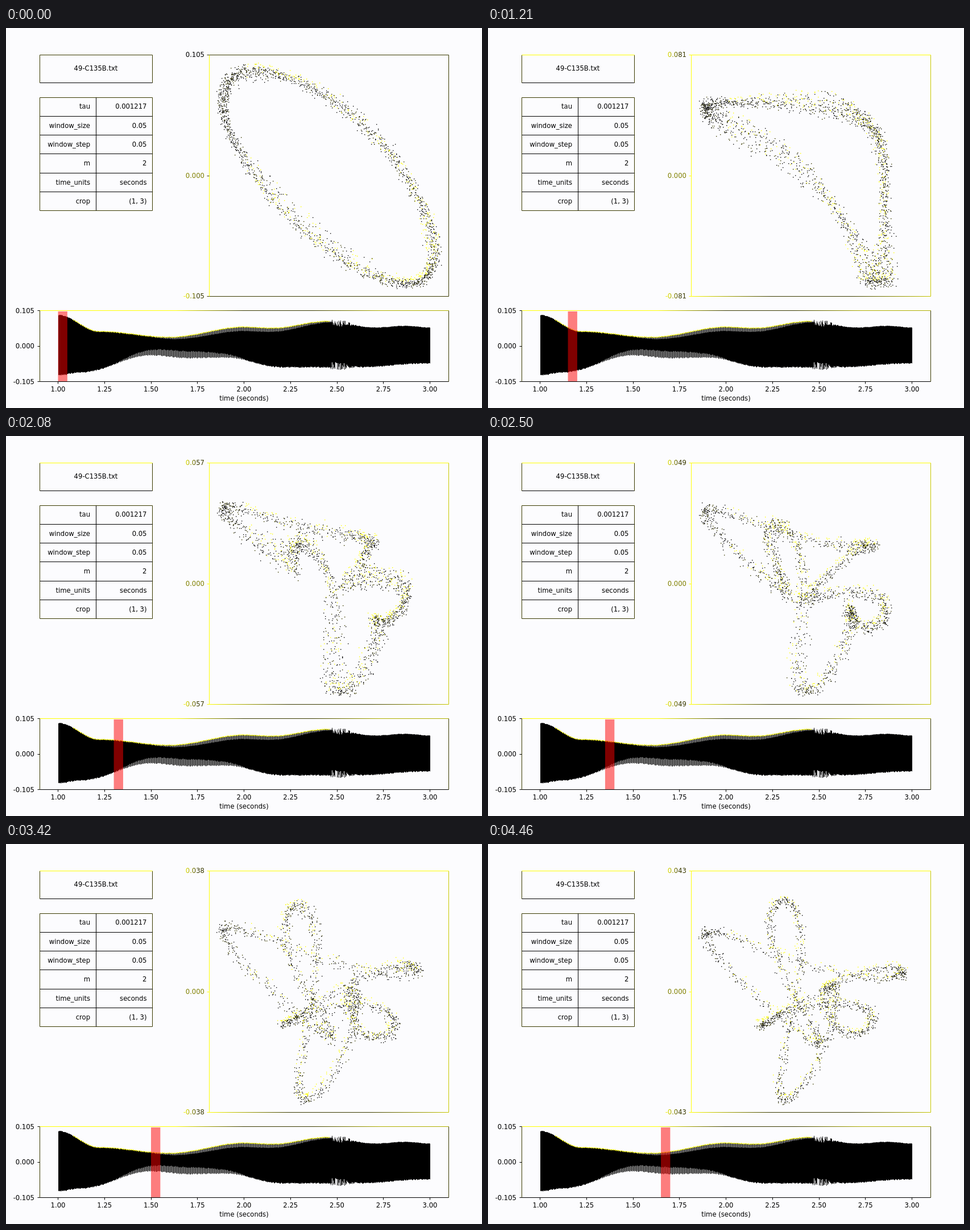
Write an HTML page with a canvas that moves like this. It is 837 px wide and 669 px high and loops after 4.5 s.

```html
<!DOCTYPE html>
<html lang="en">
<head>
<meta charset="utf-8">
<title>Delay embedding</title>
<style>
html, body { margin: 0; width: 100%; height: 100%; overflow: hidden; background: #fcfcfe; }
canvas { display: block; }
</style>
</head>
<body>
<canvas id="stage" width="837" height="669"></canvas>
<script>
const ctx = document.getElementById('stage').getContext('2d');
const INK = '#000', OLIVE = '#3a3a00', YELLOW = '#ff0';
const LOOP = 4500, WINDOWS_PER_SECOND = 3;
const TURN = 2 * Math.PI, DELAY = TURN * 3 / 8;

// Plot limit of each window, in thousandths.
const limits = [105, 97, 89, 81, 73, 66, 57, 49, 44, 40, 38, 37, 40, 43];

// Harmonics of the periodic signal, from the constant term up: [amplitude, phase in degrees].
const overtones = [[.07, 0], [.3, 0], [.3, -5], [.17, -12], [.09, 180]];
const voices = [
  { at: 0, harmonics: [[0, 0], [.9, 130]] },
  { at: 2, harmonics: [[.06, 0], [.76, 149], [.155, 68]] },
  { at: 5, harmonics: [[.08, 0], [.68, 110], [.25, 85], [.07, 18]] },
  { at: 9, harmonics: [[-.03, 0], [.47, 85], ...overtones] },
  { at: 11, harmonics: [[-.03, 0], [.26, 79], ...overtones] }
];

const mix = (a, b, f) => a + (b - a) * f;
const clamp = (v, lo, hi) => Math.min(hi, Math.max(lo, v));

function seeded(seed) {
  return () => {
    seed = seed + 0x6D2B79F5 | 0;
    let h = Math.imul(seed ^ seed >>> 15, seed | 1);
    h ^= h + Math.imul(h ^ h >>> 7, h | 61);
    return ((h ^ h >>> 14) >>> 0) / 4294967296;
  };
}

// Cosine interpolation through [x, y] knots.
function ease(knots, x) {
  const i = Math.max(1, knots.findIndex(k => k[0] >= x));
  const [[x1, y1], [x2, y2]] = [knots[i - 1], knots[i]];
  return mix(y1, y2, .5 - .5 * Math.cos(Math.PI * (x - x1) / (x2 - x1)));
}

// The signal at a (fractional) window, scaled to fill the plot.
function signalAt(position) {
  const p = clamp(position, 0, 11);
  const next = Math.max(1, voices.findIndex(v => v.at >= p));
  const a = voices[next - 1], b = voices[next];
  const f = 1 - (1 - (p - a.at) / (b.at - a.at)) ** 2;
  const wave = (voice, t) => voice.harmonics.reduce(
    (sum, [amp, phase], n) => sum + amp * Math.cos(n * t - phase * TURN / 360), 0);
  const raw = t => mix(wave(a, t), wave(b, t), f);
  let peak = 0;
  for (let t = 0; t < TURN; t += .05) peak = Math.max(peak, Math.abs(raw(t)));
  return t => .89 * raw(t) / peak;
}

function line(x1, y1, x2, y2, color = INK) {
  const [a, b, c, d] = [x1, y1, x2, y2].map(v => Math.floor(v) + .5);
  ctx.strokeStyle = color;
  ctx.beginPath();
  ctx.moveTo(a, b);
  ctx.lineTo(c, d);
  ctx.stroke();
}
function frame(x1, y1, x2, y2, [top, right, bottom, left]) {
  line(x1, y2, x2, y2, bottom);
  line(x2, y1, x2, y2, right);
  line(x1, y1, x1, y2, left);
  line(x1, y1, x2, y1, top);
}
function text(value, x, y, align = 'right', color = INK) {
  ctx.textAlign = align;
  ctx.fillStyle = color;
  ctx.fillText(value, x, y + 4);
}
function fade(x1, x2, ...colors) {
  const g = ctx.createLinearGradient(x1, 0, x2, 0);
  colors.forEach((c, i) => g.addColorStop(i / (colors.length - 1), c));
  return g;
}

function drawTable(k) {
  frame(59, 47, 257, 96.5, [k ? YELLOW : OLIVE, OLIVE, INK, OLIVE]);
  text('49-C135B.txt', 158, 71, 'center');
  frame(59, 122, 257, 321.7, [OLIVE, OLIVE, OLIVE, OLIVE]);
  line(158, 122, 158, 321.7);
  const rows = [['tau', '0.001217'], ['window_size', '0.05'], ['window_step', '0.05'],
    ['m', '2'], ['time_units', 'seconds'], ['crop', '(1, 3)']];
  rows.forEach(([name, value], i) => {
    const y = 122 + i * 33.3;
    if (i) line(59, y, 257, y);
    text(name, 148, y + 16.3);
    text(value, 247.5, y + 16.3);
  });
}

function drawOrbit(k) {
  const random = seeded(k + 11), cycles = 15, samples = 143, spread = 12;
  const jitter = () => random() + random() - 1;
  for (let c = 0; c < cycles; c++) {
    const signal = signalAt(k + c / cycles - .5);
    for (let i = 0; i < samples; i++) {
      const t = TURN * (i + random()) / samples;
      const jx = jitter(), jy = jitter();
      const x = 568 + 211 * signal(t) + jx * spread;
      const y = 260 - 212 * signal(t + DELAY) + jy * spread;
      const lit = jx * .5 + jy < -.35 && x > 420;
      ctx.fillStyle = lit ? YELLOW : random() < .3 ? OLIVE : '#111';
      ctx.fillRect(Math.round(x), Math.round(y), 1.4, 1.4);
    }
  }

  const limit = (limits[k] / 1000).toFixed(3);
  const tint = fade(312, 349, YELLOW, '#a0a000', OLIVE, OLIVE);
  const base = fade(357, 778, YELLOW, OLIVE, OLIVE, '#c8c800');
  frame(357, 47, 778, 472, [k ? YELLOW : OLIVE, k ? '#c8c800' : OLIVE, k ? base : OLIVE, YELLOW]);
  [[limit, 47, k ? tint : INK], ['0.000', 260, '#808000'], ['-' + limit, 472, tint]].forEach(([label, y, color]) => {
    line(353, y, 357, y, k ? YELLOW : OLIVE);
    text(label, 349, y, 'right', color);
  });
}

function drawWave(k) {
  const top = [[1, 505], [1.22, 534], [1.6, 544], [2, 526], [2.15, 528], [2.45, 516], [2.7, 527], [2.87, 524], [3, 527]];
  const bottom = [[1, 612], [1.12, 607], [1.5, 577], [1.7, 582], [1.9, 581], [2.2, 598], [2.6, 598], [3, 591]];
  const bump = (t, from, to) => Math.sin(Math.PI * clamp((t - from) / (to - from), 0, 1));
  const random = seeded(5);
  for (let x = 92; x < 746; x++) {
    const t = Math.min(3, 1 + (x - 91.5) / 327);
    const burst = t > 2.465 ? Math.exp(-(((t - 2.5) / .07) ** 2)) : 0;
    const high = ease(top, t) + burst * (14 * random() - 7) + random();
    const low = ease(bottom, t) + burst * (16 * random() - 10) - 2 * random();
    const coreHigh = high + 7 * bump(t, 1.45, 2.55);
    const coreLow = low - 12 * bump(t, 1.3, 2.02);
    const bar = (y1, y2, color) => {
      ctx.fillStyle = color;
      ctx.fillRect(x, y1, 1, y2 - y1);
    };
    bar(high, low, x % 3 ? '#777' : '#222');
    bar(coreHigh, coreLow, INK);
    if (t > 1.08 && t < 2.46 && x % 3) bar(high - 1, high + .8, YELLOW);
  }

  const left = 91.5 + k * 16.35;
  ctx.fillStyle = 'rgba(255,0,0,.5)';
  ctx.fillRect(left, 499, 16.35, 123);

  const topEdge = fade(59, 778, YELLOW, YELLOW, YELLOW, OLIVE, OLIVE, '#b0b000', '#b0b000');
  frame(59, 497, 778, 622, [topEdge, OLIVE, INK, OLIVE]);
  ['0.105', '0.000', '-0.105'].forEach((label, i) => {
    const y = 497.5 + i * 62.5;
    line(55, y, 59, y);
    text(label, 50, y);
  });
  for (let i = 0; i < 9; i++) {
    const x = 91.5 + i * 81.75;
    line(x, 622, x, 626);
    text((1 + i / 4).toFixed(2), x, 635.5, 'center');
  }
  text('time (seconds)', 418.5, 652, 'center');
}

let shown = -1;
function tick() {
  const k = Math.floor(performance.now() % LOOP * WINDOWS_PER_SECOND / 1000);
  if (k !== shown) {
    shown = k;
    ctx.fillStyle = '#fcfcfe';
    ctx.fillRect(0, 0, 837, 669);
    ctx.font = '11.6px "DejaVu Sans", sans-serif';
    ctx.lineWidth = 1;
    drawTable(k);
    drawOrbit(k);
    drawWave(k);
  }
  requestAnimationFrame(tick);
}
tick();
</script>
</body>
</html>
```
